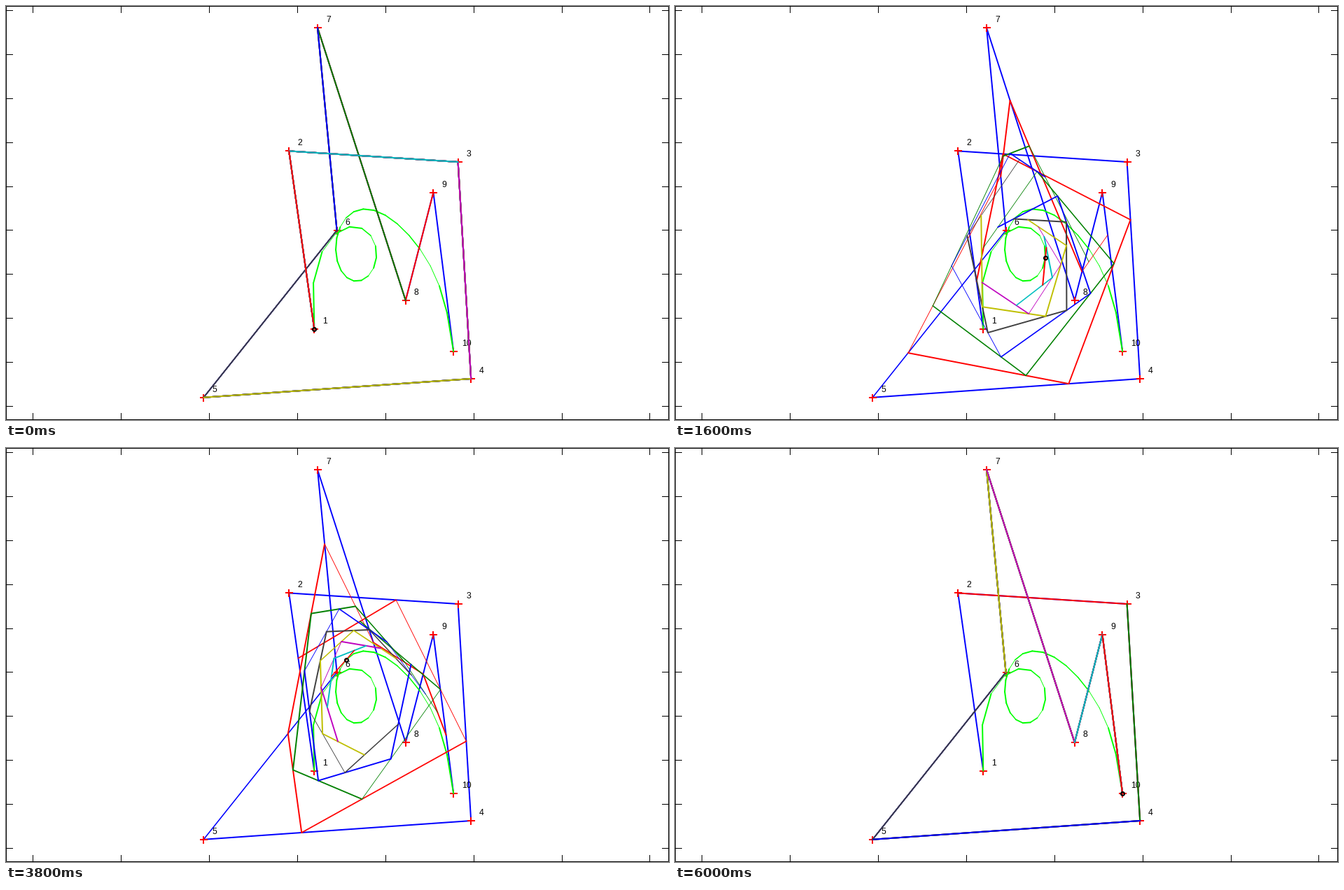
Animation of 947 by 592 pixels, one loop 6200 ms. Source, as a matplotlib script:

```python
import numpy as np
import matplotlib.pyplot as plt
from matplotlib.animation import FuncAnimation
from matplotlib.collections import LineCollection

W, H, DPI = 947, 592, 100
PX = 72 / DPI  # one pixel in points
STEPS = 30

POINTS = np.array([
    (440.3, 461.6), (404.2, 207.4), (645.6, 223), (664.2, 533), (282.2, 559.8),
    (472.6, 320.8), (445, 31), (570.8, 421), (610.4, 266.6), (639.2, 494),
])
BLUE, RED, GREEN = (0, 0, 1), (1, 0, 0), (0, .5, 0)
GRAY, YELLOW = (.25, .25, .25), (.75, .75, 0)
MAGENTA, CYAN = (.75, 0, .75), (0, .75, .75)
LEVEL_COLORS = [RED, GREEN, BLUE, GRAY, YELLOW, MAGENTA, CYAN, RED]


def casteljau(t):
    """Return every level of the construction, from ten points down to one."""
    levels = [POINTS]
    while len(levels[-1]) > 1:
        p = levels[-1]
        levels.append((1 - t) * p[:-1] + t * p[1:])
    return levels


def pairs(p):
    return np.stack([p[:-1], p[1:]], axis=1)


def pen_widths(segs):
    """Two-pixel pen that thins to one pixel on some slopes."""
    dx, dy = np.abs(segs[:, 1] - segs[:, 0]).T
    thin = (dy > 1.33 * dx) & (dy < 2.27 * dx)
    return np.where(thin, 1, 2) * np.maximum(dx, dy) / np.hypot(dx, dy) * PX


def add_lines(segs, color, z, widths=None, cap="round"):
    lines = LineCollection(segs, colors=color, zorder=z, snap=False, capstyle=cap,
                           linewidths=pen_widths(segs) if widths is None else widths)
    ax.add_collection(lines, autolim=False)
    return lines


fig = plt.figure(figsize=(W / DPI, H / DPI), dpi=DPI, facecolor="white")
ax = fig.add_axes([0, 0, 1, 1])
ax.set_xlim(0, W)
ax.set_ylim(H, 0)
ax.axis("off")

# Box and inward ticks, centred on whole pixels
R, B = W - 1, H - 1
frame = [[(0, 0), (R, 0)], [(0, B), (R, B)], [(0, 0), (0, B)], [(R, 0), (R, B)]]
for x in np.round(38.4 + 125.87 * np.arange(8)):
    frame += [[(x, 0), (x, 9.5)], [(x, B - 9.5), (x, B)]]
for y in np.round(5.9 + 62.92 * np.arange(10)):
    frame += [[(0, y), (9.5, y)], [(R - 9.5, y), (R, y)]]
add_lines(np.array(frame) + .5, "black", 1, PX, "butt")

# Control polygon, labelled points and the finished curve
add_lines(pairs(POINTS), BLUE, 2)
ax.plot(*POINTS.T, "+", color=RED, ms=11 * PX, mew=2 * PX, zorder=3)
for n, (x, y) in enumerate(POINTS, 1):
    ax.text(x + 12, y - 8, str(n), family="Liberation Sans", size=12.3 * PX,
            color="black", va="baseline", zorder=3.5)
curve = np.array([casteljau(k / STEPS)[-1][0] for k in range(STEPS + 1)])
add_lines(pairs(curve), (0, 1, 0), 4)

# Moving construction lines
seg_colors = [c for k, c in enumerate(LEVEL_COLORS) for _ in range(8 - k)]
web = add_lines(pairs(POINTS)[:1], seg_colors, 5)
dot, = ax.plot([], [], "o", mfc="none", mec="black", ms=5 * PX, mew=2 * PX,
               zorder=6)


def draw(i):
    levels = casteljau(i / STEPS)
    segs = np.concatenate([pairs(p) for p in levels[1:-1]])
    web.set_segments(segs)
    web.set_linewidths(pen_widths(segs))
    dot.set_data(*levels[-1].T)
    return web, dot


anim = FuncAnimation(fig, draw, frames=STEPS + 1, interval=200, repeat=True)
plt.show()
```
